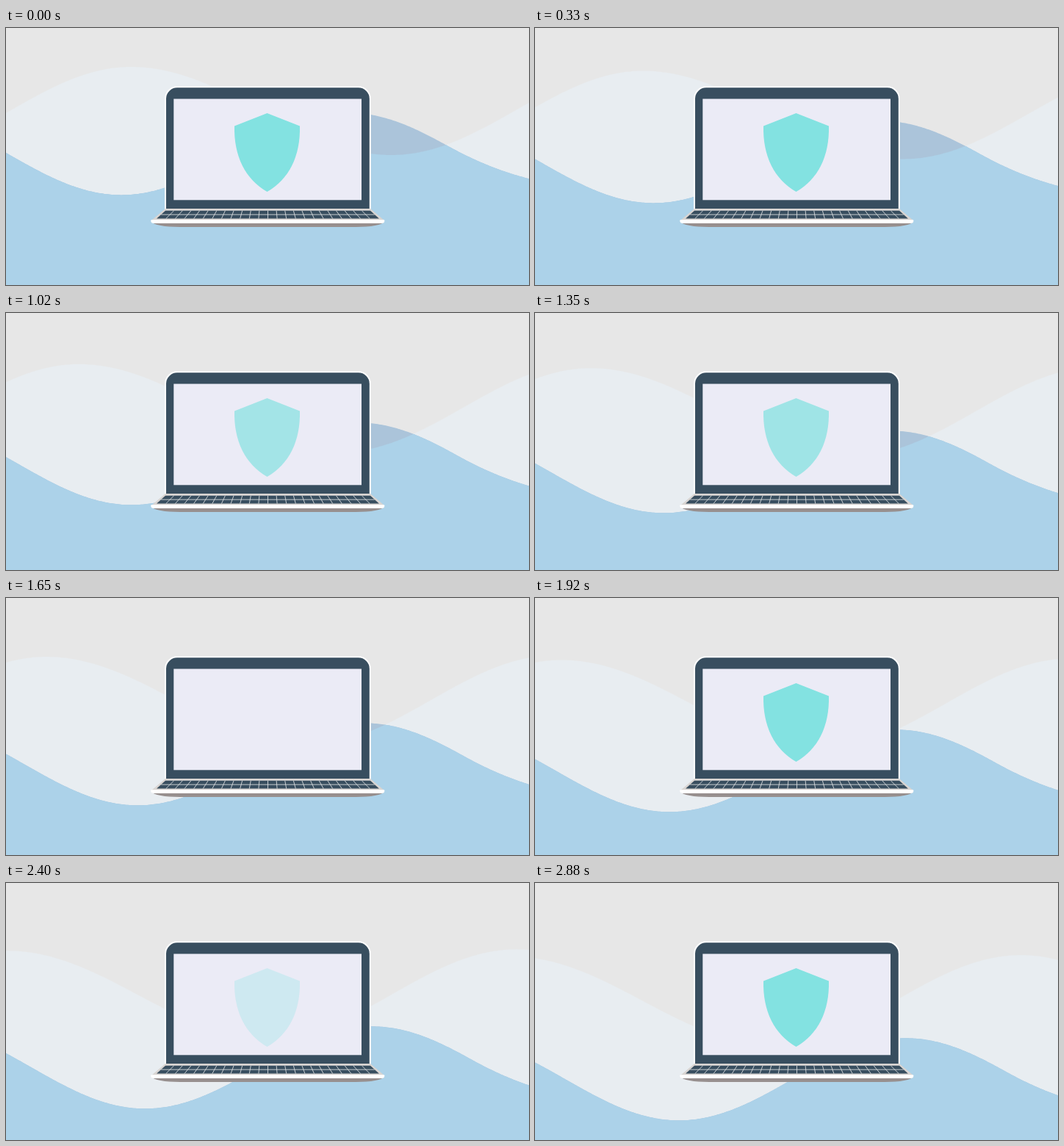
Animation of 712 by 350 pixels, one loop 2910 ms. Source, as an HTML page with a canvas:

```html
<!DOCTYPE html>
<html lang="en">
<head>
<meta charset="utf-8">
<title>Laptop shield</title>
<style>
html, body { margin: 0; width: 100%; height: 100%; overflow: hidden; background: #e7e7e7; }
canvas { display: block; width: 712px; height: 350px; }
</style>
</head>
<body>
<canvas id="stage" width="712" height="350"></canvas>
<script>
const W = 712, H = 350, LOOP = 2910, STEP = 30;
const ctx = document.getElementById('stage').getContext('2d');

// Shield opacity over time: [ms, alpha]
const FLICKER = [
  [0, 1], [570, 1], [660, 0.64], [1350, 0.72], [1620, 0.72], [1650, 0],
  [1770, 0], [1890, 1], [2190, 1], [2340, 0.28], [2460, 0.28], [2610, 1], [LOOP, 1]
];

function shieldAlpha(t) {
  const i = FLICKER.findIndex(k => k[0] > t);
  const [t0, a0] = FLICKER[i - 1], [t1, a1] = FLICKER[i];
  return a0 + (a1 - a0) * (t - t0) / (t1 - t0);
}

function blueWave(x) {
  if (x > 600) {
    const u = x - 600;
    return 159.8 + 0.56 * u - 0.00138 * u * u;
  }
  return 171.4 + 56 * Math.cos(Math.PI * (x - 157) / 309);
}

function paleWave(x) {
  if (x < 170) return 113 - 60 * Math.cos(Math.PI * (x - 170) / 330);
  if (x < 525) return 113 - 60 * Math.cos(Math.PI * (x - 170) / 355);
  return 112 + 61 * Math.cos(Math.PI * (x - 525) / 338);
}

// Area below a wave shifted by (dx, dy)
function waveArea(fn, dx, dy) {
  const p = new Path2D();
  p.moveTo(-2, H + 2);
  for (let x = -2; x <= W + 2; x += 2) p.lineTo(x, fn(x - dx) + dy);
  p.lineTo(W + 2, H + 2);
  p.closePath();
  return p;
}

function poly(points, color) {
  ctx.beginPath();
  points.forEach(([x, y]) => ctx.lineTo(x, y));
  ctx.closePath();
  ctx.fillStyle = color;
  ctx.fill();
}

function fill(path, color) {
  ctx.fillStyle = color;
  ctx.fill(path);
}

function drawWaves(t) {
  const s = t / 1000;
  const blue = waveArea(blueWave, 13.5 * s, 33.3 * s);
  const pale = waveArea(paleWave, -70 * s, 16.4 * s);
  fill(pale, '#e8edf1');
  fill(blue, '#abc4da');
  ctx.save();
  ctx.clip(pale);
  fill(blue, '#acd2e9');
  ctx.restore();
}

function drawKeyboard() {
  const cx = 356.5, top = 248.8, bottom = 259.6, mid = 254.1;
  const half = y => 139.5 + (y - top) * 1.1;
  poly([[217, 246], [496, 246], [515, 262], [198, 262]], '#d9d5d2');
  poly([[cx - half(top), top], [cx + half(top), top],
        [cx + half(bottom), bottom], [cx - half(bottom), bottom]], '#384e5f');
  ctx.strokeStyle = '#d9dcde';
  ctx.lineWidth = 0.9;
  ctx.beginPath();
  ctx.moveTo(cx - half(mid), mid);
  ctx.lineTo(cx + half(mid), mid);
  const cols = 24;
  for (let i = 1; i < cols; i++) {
    const k = i / cols * 2 - 1;
    ctx.moveTo(cx + k * half(top), top);
    ctx.lineTo(cx + k * half(bottom), bottom);
  }
  ctx.stroke();
}

function drawLaptop() {
  const lid = new Path2D();
  lid.roundRect(216, 79.3, 280.8, 168, [17, 17, 0, 0]);
  fill(lid, '#ffffff');
  const frame = new Path2D();
  frame.roundRect(218, 81.3, 276.8, 165, [15, 15, 0, 0]);
  fill(frame, '#384e5f');
  ctx.fillStyle = '#ebebf6';
  ctx.fillRect(228.3, 96.5, 255.7, 137.8);

  drawKeyboard();

  const belly = new Path2D();
  belly.moveTo(199, 265);
  belly.bezierCurveTo(206, 270, 222, 271, 246, 271);
  belly.lineTo(467, 271);
  belly.bezierCurveTo(491, 271, 507, 270, 514, 265);
  belly.closePath();
  fill(belly, '#978f8e');

  const edge = new Path2D();
  edge.roundRect(197.3, 261.2, 318, 4.8, [1, 1, 4, 4]);
  fill(edge, '#ffffff');
}

function drawShield(alpha) {
  const p = new Path2D();
  p.moveTo(355.5, 116);
  p.lineTo(400, 133.5);
  p.bezierCurveTo(401, 175, 385, 206, 355.5, 223);
  p.bezierCurveTo(326, 206, 310, 175, 311, 133.5);
  p.closePath();
  ctx.globalAlpha = alpha;
  fill(p, '#83e2e1');
  ctx.globalAlpha = 1;
}

function draw(t) {
  ctx.fillStyle = '#e7e7e7';
  ctx.fillRect(0, 0, W, H);
  drawWaves(t);
  drawLaptop();
  drawShield(shieldAlpha(t));
}

const start = performance.now();
function tick() {
  const t = (performance.now() - start) % LOOP;
  draw(Math.floor(t / STEP) * STEP);
  requestAnimationFrame(tick);
}
tick();
</script>
</body>
</html>
```
